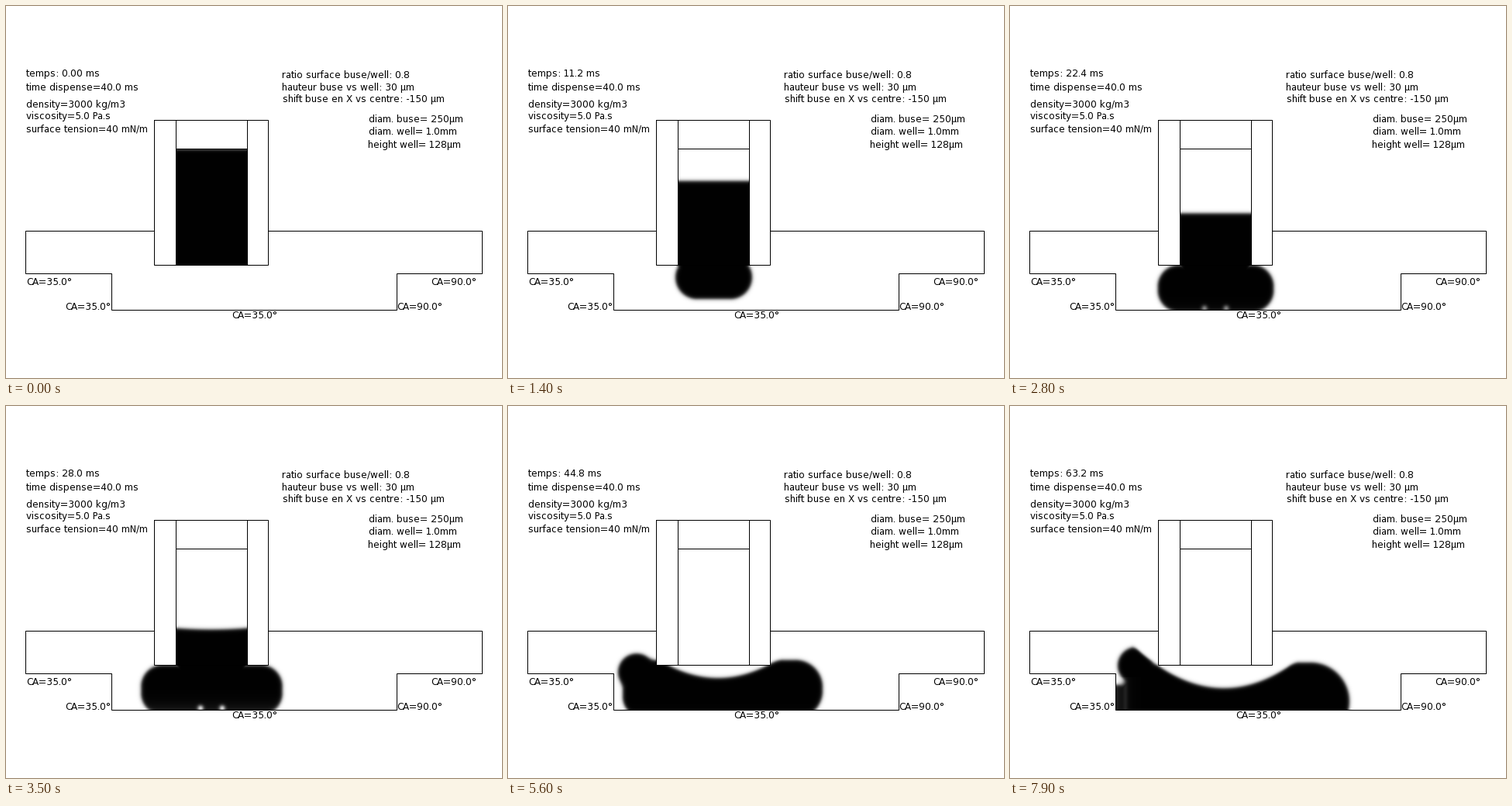
A matplotlib script that plays this animation: 640x480 px, repeating every 8 s.

```python
import numpy as np
import matplotlib.pyplot as plt
from matplotlib.animation import FuncAnimation

plt.rcParams["text.hinting_factor"] = 1   # whole-pixel letter spacing

W, H = 640, 480
FRAMES, STEP = 80, 100
PX = 0.72                                 # one pixel in points at 100 dpi
X0, X1, Y0, Y1 = 130, 456, 184, 392       # window holding the liquid
AXIS, BORE, LIP = 265, 46, 334            # nozzle axis, bore half-width, tip

fig = plt.figure(figsize=(W / 100, H / 100), dpi=100, facecolor="white")
ax = fig.add_axes([0, 0, 1, 1])

gx, gy = np.meshgrid(np.arange(X0, X1) + 0.5, np.arange(Y0, Y1) + 0.5)
bore = (abs(gx - AXIS) < BORE) & (gy < LIP)
space = ((gy > LIP) | (abs(gx - AXIS) > 74)) & ((gx > 136) | (gy < 345))


def ease(t, a, b):
    u = np.clip((t - a) / (b - a), 0, 1)
    return u * u * (3 - 2 * u)


def bell(t, mid, width):
    return np.exp(-((t - mid) / width) ** 2)


def join(a, b, k=8):
    """Smooth union of two distance fields."""
    h = np.clip(0.5 + (b - a) / (2 * k), 0, 1)
    return b + (a - b) * h - k * h * (1 - h)


def round_box(left, right, top, bottom, r):
    qx = abs(gx - (left + right) / 2) - (right - left) / 2 + r
    qy = abs(gy - (top + bottom) / 2) - (bottom - top) / 2 + r
    outer = np.hypot(np.maximum(qx, 0), np.maximum(qy, 0))
    return outer + np.minimum(np.maximum(qx, qy), 0) - r


def surface(t):
    """Free surface: sinks at constant speed and hollows into a bowl."""
    depth = min(184 + 29.8 * t, 364)
    mid = AXIS + 11 * ease(t, 4.7, 6.4)
    return depth - 0.004 * ease(t, 3, 4.7) * (gx - mid) ** 2


def body(t):
    """Distance to the drop that grows, spreads and piles up at its ends."""
    spread = BORE + 23.5 * 0.3 * np.log1p(np.exp((t - 1.6) / 0.3))
    left = max(AXIS - spread, 148)
    right = min(AXIS + spread + 1, 426 + 8 * (t - 6.4))
    bottom = 331 + 73 * (1 - np.exp(-t / 1.35))
    r = min(28, bottom - 331) + 8 * np.clip(t - 4.7, 0, 2.8)
    swell = 9 * np.sin(np.pi * np.clip((t - 4.7) / 3.6, 0, 1))
    top = min(LIP, bottom - 2 * r) if t < 4.7 else LIP - swell
    bottom = max(bottom, top + 2 * r)

    radius = np.where(gx < AXIS, min(r, 28), r)
    drop = round_box(left, right, top, bottom, radius)
    throat = np.maximum(abs(gx - AXIS) - BORE, gy - bottom + r)
    d = np.minimum(drop, throat)
    if t > 3.5:
        rise = ease(t, 4.5, 6.3)
        lobe = np.hypot(gx - left - 24 + 9 * rise, gy - 360 + 25 * rise) - 24
        wetted = np.maximum(385 - 17 * (t - 6.4) - gy, gx - 150)
        d = join(join(d, lobe, 5), wetted)
    return d


def liquid(t):
    cut = surface(t) - gy
    d = np.where(bore, cut, -join(-body(t), -cut, 5))
    ink = 1 / (1 + np.exp(np.clip(d / 1.3, -30, 30)))
    # air trapped on the floor, paler liquid near floor and wall
    for cx in (AXIS - 14, AXIS + 14):
        ink -= 0.9 * bell(t, 3.3, 0.6) * bell(np.hypot(gx - cx, gy - 390), 0, 4)
    ink *= 1 - 0.12 * bell(t, 4, 1) * np.exp((gy - Y1) / 8)
    ink *= 1 - 0.15 * ease(t, 6.4, 7.9) * np.exp(-abs(gx - 136) / 9) * (gy > 350)
    return np.clip(ink * (bore | space), 0, 1)


rgba = np.zeros(gx.shape + (4,))
image = ax.imshow(rgba, extent=(X0, X1, Y1, Y0), interpolation="nearest",
                  aspect="auto", zorder=1)
ax.set_xlim(0, W)
ax.set_ylim(H, 0)
ax.axis("off")


def line(*pts):
    ax.plot(*zip(*pts), color="black", lw=PX, solid_capstyle="projecting",
            solid_joinstyle="miter", snap=True, zorder=2)


def label(x, y, s):
    return ax.text(x, y, s, family="DejaVu Sans", size=12 * PX, color="black",
                   va="baseline", zorder=3)


line((191, 290), (25, 290), (25, 345), (136, 345), (136, 392), (504, 392),
     (504, 345), (614, 345), (614, 290), (338, 290))
line((191, 147), (338, 147), (338, LIP), (191, LIP), (191, 147))
for x in (AXIS - BORE, AXIS + BORE):
    line((x, 147), (x, LIP))
line((AXIS - BORE, 184), (AXIS + BORE, 184))

clock = label(26, 91, "")
for x, y, s in [
    (26, 109, "time dispense=40.0 ms"),
    (26, 131, "density=3000 kg/m3"),
    (26, 146, "viscosity=5.0 Pa.s"),
    (26, 162, "surface tension=40 mN/m"),
    (356, 92, "ratio surface buse/well: 0.8"),
    (356, 109, "hauteur buse vs well: 30 µm"),
    (357, 124, "shift buse en X vs centre: -150 µm"),
    (468, 150, "diam. buse= 250µm"),
    (468, 166, "diam. well= 1.0mm"),
    (467, 183, "height well= 128µm"),
]:
    label(x, y, s)
for x, y, angle in [(26, 360, 35), (76, 392, 35), (291, 403, 35),
                    (504, 392, 90), (548, 360, 90)]:
    label(x, y, f"CA={angle:.1f}°")


def draw(i):
    ms = 0.8 * i
    clock.set_text(f"temps: {ms:.{2 if ms < 9.99 else 1}f} ms")
    rgba[..., 3] = liquid(i * STEP / 1000)
    image.set_data(rgba)
    return image, clock


anim = FuncAnimation(fig, draw, frames=FRAMES, interval=STEP, repeat=True)
plt.show()
```
